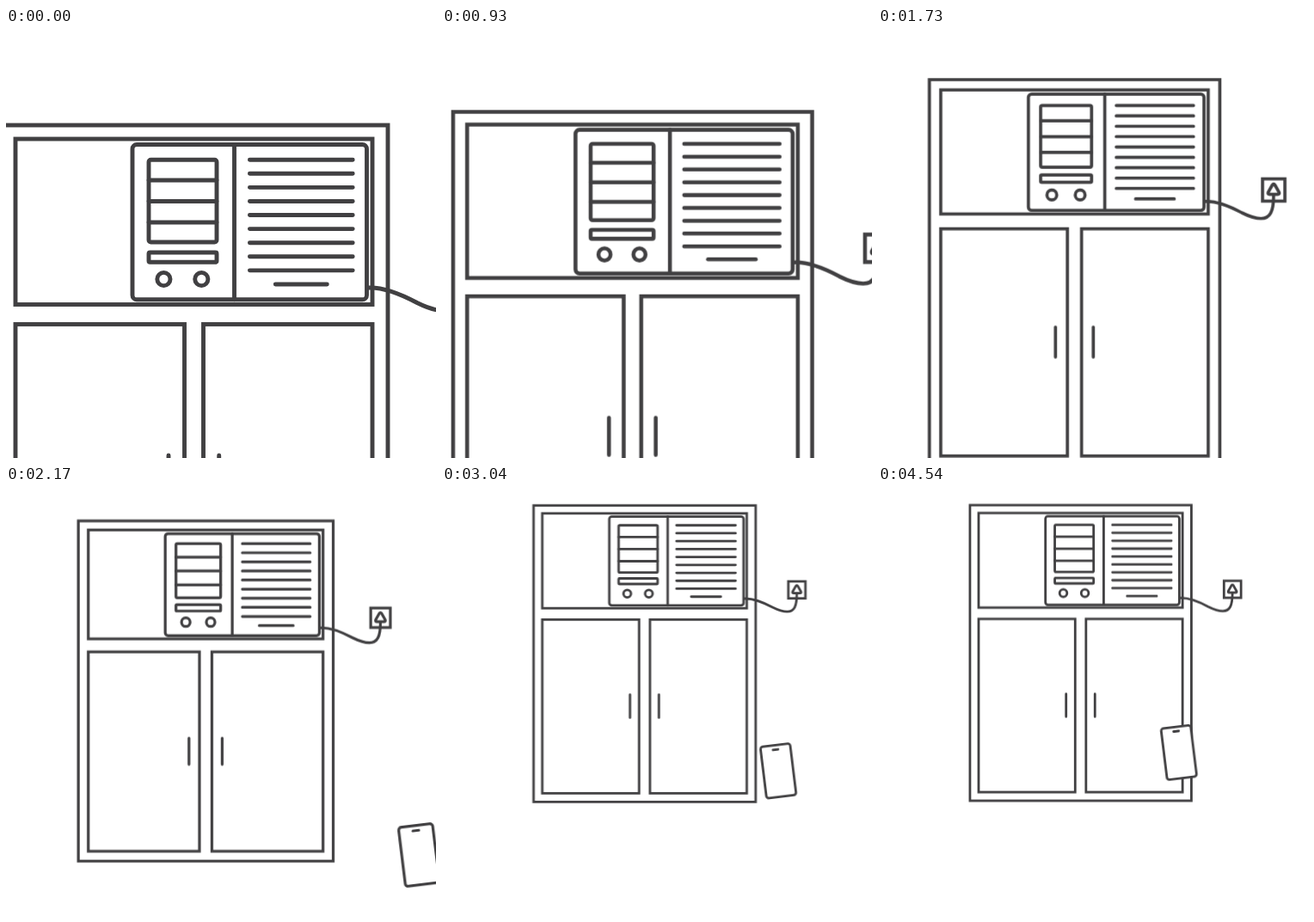
Recreate the animation shown at these times as an HTML page. Size 500 by 500 pixels, loop 5.1 s.

```html
<!DOCTYPE html>
<html lang="en">
<head>
<meta charset="utf-8">
<title>Radio cabinet</title>
<style>
  html, body {
    margin: 0;
    width: 100%;
    height: 100%;
    overflow: hidden;
    background: #fff;
  }
  svg {
    display: block;
    width: 100vw;
    height: 100vh;
  }
  .scene {
    fill: none;
    stroke: #414042;
    stroke-width: 4.9;
    transform-origin: 258.3px -98.7px;
    animation: zoom 5100ms infinite;
  }
  .solid { fill: #fff; }
  .round { stroke-linecap: round; stroke-linejoin: round; }
  .phone { animation: slide 5100ms infinite; }

  /* Quadratic ease-in-out, split at the halfway point */
  @keyframes zoom {
    0% {
      transform: scale(1);
      animation-timing-function: cubic-bezier(.3333, 0, .6667, .3333);
    }
    31.18% {
      transform: scale(.7857);
      animation-timing-function: cubic-bezier(.3333, .6667, .6667, 1);
    }
    62.35%, 100% { transform: scale(.5714); }
  }
  @keyframes slide {
    0% {
      transform: translate(326px, 160.6px);
      animation-timing-function: cubic-bezier(.3333, 0, .6667, .3333);
    }
    44.56% {
      transform: translate(163px, 80.3px);
      animation-timing-function: cubic-bezier(.3333, .6667, .6667, 1);
    }
    89.12%, 100% { transform: translate(0, 0); }
  }
</style>
</head>
<body>
<svg viewBox="0 0 500 500">
  <g class="scene">
    <g class="cabinet">
      <rect x="-6.6" y="113" width="450.6" height="601.5"/>
      <rect x="11" y="129" width="415" height="192.5"/>
      <rect x="11" y="344.5" width="196.5" height="352.5"/>
      <rect x="229.5" y="344.5" width="196.5" height="352.5"/>
      <path class="round" d="M189 497v46.5M247.7 497v46.5"/>
    </g>

    <g class="radio round">
      <rect class="solid" x="147" y="135.5" width="272.5" height="180.3" rx="5"/>
      <path d="M265.5 135.5v180.3"/>
      <rect x="166" y="153.2" width="79" height="95.8" rx="2.5"/>
      <path d="M166 177h79M166 201.5h79M166 226h79"/>
      <rect x="166" y="261" width="79" height="11.3" rx="1.5"/>
      <circle cx="183.4" cy="292" r="7.6"/>
      <circle cx="227.3" cy="292" r="7.6"/>
      <path id="grille"/>
      <path d="M313.3 298h60"/>
    </g>

    <g class="power round">
      <rect x="510.3" y="267" width="34.7" height="34.5" stroke-linejoin="miter"/>
      <path d="M525.5 276.5Q527.5 273.5 529.5 276.5L536 288Q537 291 534 291H521Q518 291 519 288Z"/>
      <path d="M421 302C441 301 464 312 478 319.5C488 324.5 497 328.5 508 328.5C522 328.5 527.5 318 527.5 292"/>
    </g>

    <g class="phone round">
      <g transform="translate(418.5 616.5) rotate(-7)">
        <rect class="solid" x="-30.3" y="-52.5" width="60.6" height="105" rx="5"/>
        <path d="M-5.5 -43.6h10.5"/>
      </g>
    </g>
  </g>
</svg>
<script>
  const rows = Array.from({ length: 9 }, (_, i) => `M283.4 ${153.2 + 16.08 * i}h119.8`);
  document.getElementById('grille').setAttribute('d', rows.join(''));
</script>
</body>
</html>
```
